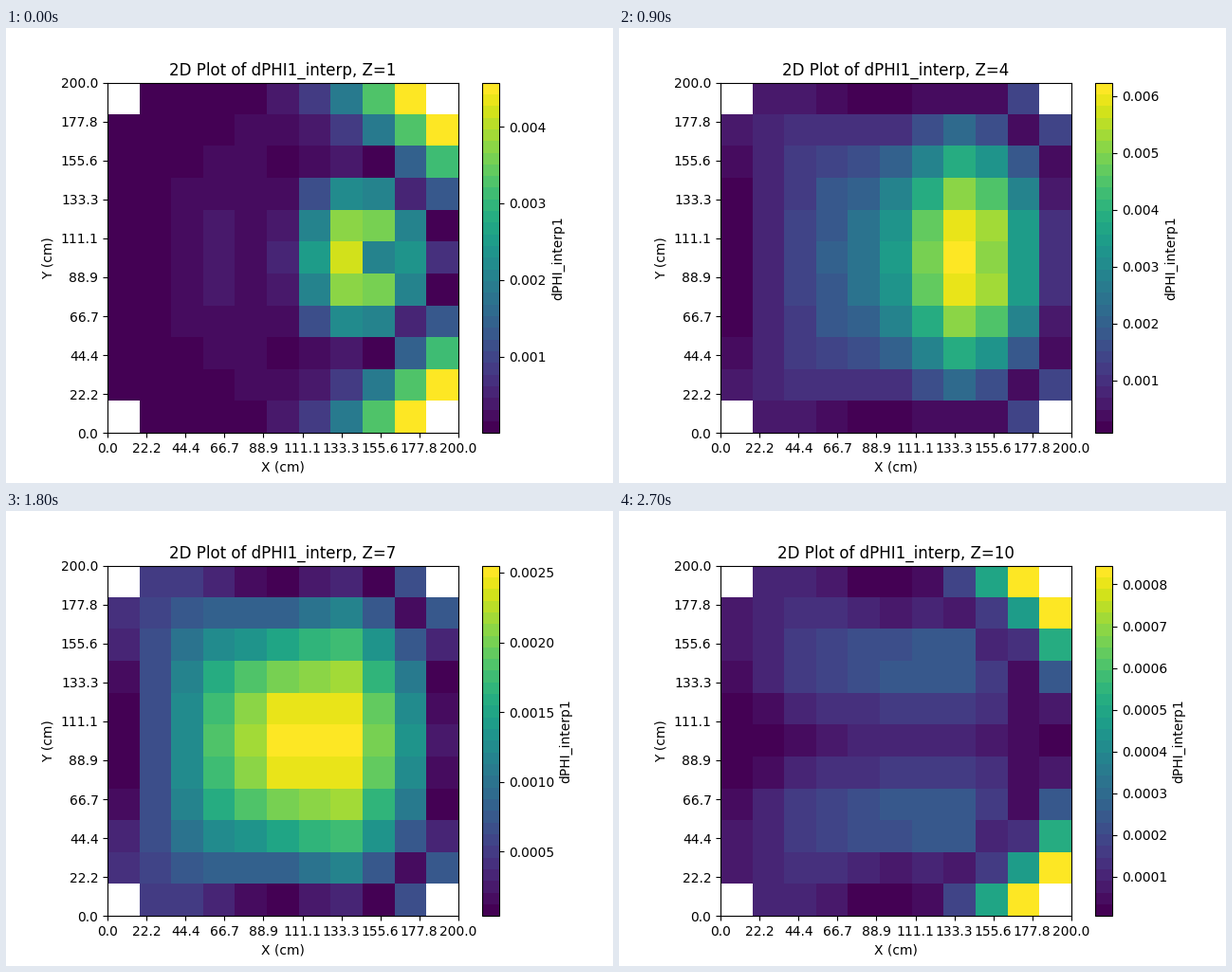
Recreate the animation shown at these times as a matplotlib script. Size 640x480 px, loop 3000 ms.

```python
import matplotlib
import matplotlib.pyplot as plt
import numpy as np
from matplotlib.animation import FuncAnimation

CMAP = matplotlib.colormaps["viridis"].resampled(30)
TICKS = np.linspace(0, 200, 10)
PLANES = 10

X = np.arange(11)
R = abs(X - 5)[:, None]  # distance from the horizontal midline
CORNER_STEPS = (10 - X) + (5 - R)

PEAK_VALUES = [4.574e-3, 8.5e-3, 1.124e-2, 6.24e-3, 4.45e-3,
               3.377e-3, 2.55e-3, 1.812e-3, 1.1e-3, 8.45e-4]


def along_z(z, **keys):
    """Piecewise linear curve through key points named z1, z2, ..."""
    return np.interp(z, [int(name[1:]) for name in keys], list(keys.values()))


def field(z):
    """Signed sum of a broad mode, a local peak, a left rim and the right corners."""
    arch = np.cos(np.pi * R / 10)
    edge = np.sin(np.pi * R / 10) ** 2
    ring = np.sin(np.pi * R / 5) ** 2

    broad_x = np.interp(X, [0, 3, 5, 7, 9, 10], [0, 0.74, 1, 0.94, 0.48, 0.05])
    rim_x = np.interp(X, [0, 2, 5, 7, 10], [1, 1, 0, 1, 0])
    peak_x = np.exp(-((X - 7.5) / 1.4) ** 2 / 2)
    hole = np.exp(-2 * ((X - 8) ** 2 + R ** 2))

    broad = along_z(z, z1=-0.1, z3=0.12, z4=0.4, z6=0.88, z8=1, z9=1, z10=0.12)
    peak = along_z(z, z1=1.05, z3=1, z4=0.65, z5=0.38, z6=0.19, z8=0)
    sharpness = along_z(z, z1=3, z4=1.3)
    dip = along_z(z, z1=0.5, z3=0.2, z5=0)
    rim = along_z(z, z1=0, z3=0.05, z5=0.13, z8=0.18, z10=0.1)
    rings = along_z(z, z8=0, z10=0.18)
    corner = along_z(z, z1=1, z3=0.3, z6=0.32, z8=0.42, z10=1.1)
    reach = along_z(z, z1=3, z3=2, z8=2, z10=2.6)

    return (broad_x * (broad * arch + rings * ring)
            + peak * peak_x * arch ** sharpness - dip * hole
            + rim * rim_x * edge
            - corner * np.exp(-(CORNER_STEPS / reach) ** 2))


def value_range(z):
    high = PEAK_VALUES[z - 1]
    low = high * along_z(z, z1=0.0004, z3=0.0052, z4=0.0128, z8=0.0166, z10=0.0077)
    return low, high


def plane(z):
    cells = abs(field(z))
    cells[np.ix_([0, 10], [0, 10])] = np.nan
    low, high = value_range(z)
    return low + (high - low) * cells / np.nanmax(cells)


fig = plt.figure(figsize=(6.4, 4.8), dpi=100)


def draw(frame):
    z = frame + 1
    low, high = value_range(z)
    fig.clf()
    ax = fig.add_subplot()
    image = ax.imshow(plane(z), cmap=CMAP, origin="lower", extent=(0, 200, 0, 200),
                      interpolation="nearest", vmin=low, vmax=high)
    fig.colorbar(image, ax=ax, label="dPHI_interp1")
    labels = [f"{tick:.1f}" for tick in TICKS]
    ax.set_xticks(TICKS, labels)
    ax.set_yticks(TICKS, labels)
    ax.set_xlabel("X (cm)")
    ax.set_ylabel("Y (cm)")
    ax.set_title(f"2D Plot of dPHI1_interp, Z={z}")
    return []


anim = FuncAnimation(fig, draw, frames=PLANES, interval=300, init_func=lambda: [],
                     repeat=True, repeat_delay=0)
plt.show()
```
